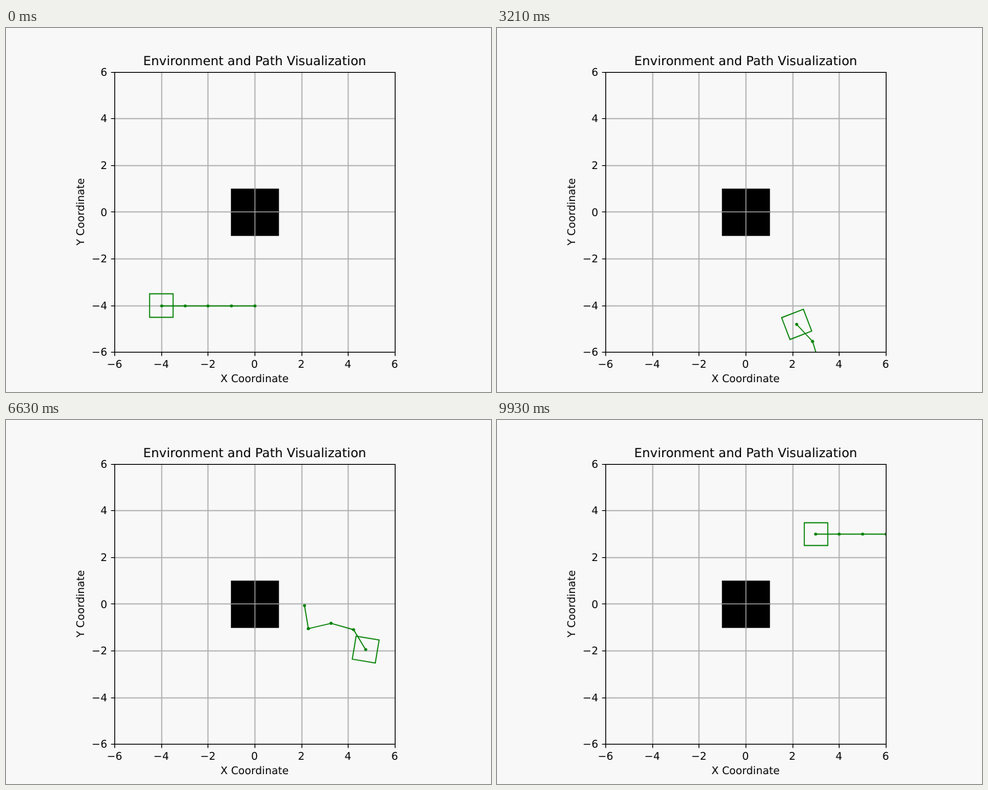
An HTML page for the animation above (9.96 s loop, 640 by 480 pixels).

```html
<!DOCTYPE html>
<html lang="en">
<head>
<meta charset="utf-8">
<title>Environment and Path Visualization</title>
<style>
  html, body { margin: 0; width: 100%; height: 100%; overflow: hidden; background: #f8f8f8; }
  svg { display: block; width: 640px; height: 480px; }
  text { font: 13.89px "DejaVu Sans", sans-serif; text-anchor: middle; text-rendering: geometricPrecision; }
  .title { font-size: 16.6px; }
  .ytick { text-anchor: end; }
  .grid { stroke: #b0b0b0; stroke-width: 1.5; }
  .fine { stroke: #b0b0b0; stroke-width: 1.05; }
  .axis { stroke: #000; stroke-width: 1.11; fill: none; }
  .robot { stroke: #008000; stroke-width: 1.39; fill: none; }
  .arm { stroke-linejoin: round; }
  .joint { fill: #008000; }
</style>
</head>
<body>
<svg viewBox="0 0 640 480">
  <defs><clipPath id="plot"><rect x="143.2" y="57.6" width="369.6" height="369.6"/></clipPath></defs>
  <rect width="640" height="480" fill="#f8f8f8"/>
  <g id="grid" class="grid"></g>
  <rect x="296.8" y="211.8" width="63.4" height="62.4"/>
  <path class="fine" d="M328.5 212V274M297 242.5H360"/>
  <g id="robot" clip-path="url(#plot)"></g>
  <rect class="axis" x="143.5" y="58.5" width="370" height="369"/>
  <g id="ticks"></g>
  <text class="title" x="328.2" y="49">Environment and Path Visualization</text>
  <text x="328" y="467">X Coordinate</text>
  <text transform="translate(103 242.4) rotate(-90)">Y Coordinate</text>
</svg>
<script>
const LOOP = 9960, STEP = 30, UNIT = 30.8;

// Waypoints joined by straight, even motion; angles are the base heading, then each arm link.
const stretched = deg => Array(5).fill(deg);
const waypoints = [
  { t: 0, at: [-4, -4], angles: stretched(0) },
  { t: 1020, at: [-1.9, -4.1], angles: [-19, -73, 34, -17, -15] },
  { t: 2040, at: [-0.93, -4.34], angles: [-30, -49, 10, -34, 0] },
  { t: 3210, at: [2.19, -4.82], angles: [-69, -47, -73, -38, -10] },
  { t: 3720, at: [3.68, -4.75], angles: [-105, -65, -111, -96, -28] },
  { t: 5770, at: [4.65, -2.46], angles: [-138, -181, -162, -98, -221] },
  { t: 8160, at: [4.96, -1.07], angles: [-281, -341, -256, -289, -331] },
  { t: 9930, at: [3, 3], angles: stretched(-360) }
];

const px = x => 328 + UNIT * x;
const py = y => 242.4 - UNIT * y;
const snap = v => Math.floor(v + 0.5) + 0.5;
const rad = deg => deg * Math.PI / 180;
const mix = (a, b, f) => a.map((v, i) => v + (b[i] - v) * f);

function add(parent, tag, attrs, text) {
  const el = document.createElementNS("http://www.w3.org/2000/svg", tag);
  for (const key in attrs) el.setAttribute(key, attrs[key]);
  if (text) el.textContent = text;
  return document.getElementById(parent).appendChild(el);
}

for (let v = -6; v <= 6; v += 2) {
  const x = snap(px(v)), y = snap(py(v));
  const label = String(v).replace("-", "\u2212");
  if (Math.abs(v) < 6) add("grid", "path", { d: `M${x} 58V427M143 ${y}H513` });
  add("ticks", "path", { class: "axis", d: `M${x} 427.5v4.9M143.5 ${y}h-4.9` });
  add("ticks", "text", { x: px(v), y: 448 }, label);
  add("ticks", "text", { class: "ytick", x: 133.5, y: Math.round(py(v) + 5.2) }, label);
}

const body = add("robot", "polygon", { class: "robot" });
const arm = add("robot", "polyline", { class: "robot arm" });
const joints = Array.from({ length: 5 }, () => add("robot", "circle", { class: "joint", r: 2.1 }));

function poseAt(t) {
  const i = Math.max(1, waypoints.findIndex(w => w.t >= t));
  const a = waypoints[i - 1], b = waypoints[i];
  const f = (t - a.t) / (b.t - a.t);
  return { at: mix(a.at, b.at, f), angles: mix(a.angles, b.angles, f) };
}

// Point reached from p by going a length (in plot units) along an angle.
const step = ([x, y], deg, length) =>
  [x + UNIT * length * Math.cos(rad(deg)), y - UNIT * length * Math.sin(rad(deg))];

function draw(t) {
  const { at, angles: [heading, ...links] } = poseAt(t);
  const aligned = heading % 360 === 0;
  const fit = list => aligned ? list.map(p => p.map(snap)) : list;

  const base = [px(at[0]), py(at[1])];
  const corners = fit([45, 135, 225, 315].map(d => step(base, heading + d, Math.SQRT1_2)));
  const chain = [base];
  for (const deg of links) chain.push(step(chain[chain.length - 1], deg, 1));
  const points = fit(chain);

  body.setAttribute("points", corners.join(" "));
  arm.setAttribute("points", points.join(" "));
  joints.forEach((dot, i) => {
    dot.setAttribute("cx", points[i][0]);
    dot.setAttribute("cy", points[i][1]);
  });
}

const start = performance.now();
function tick() {
  const t = (performance.now() - start) % LOOP;
  draw(Math.floor(t / STEP) * STEP);
  requestAnimationFrame(tick);
}
tick();
</script>
</body>
</html>
```
